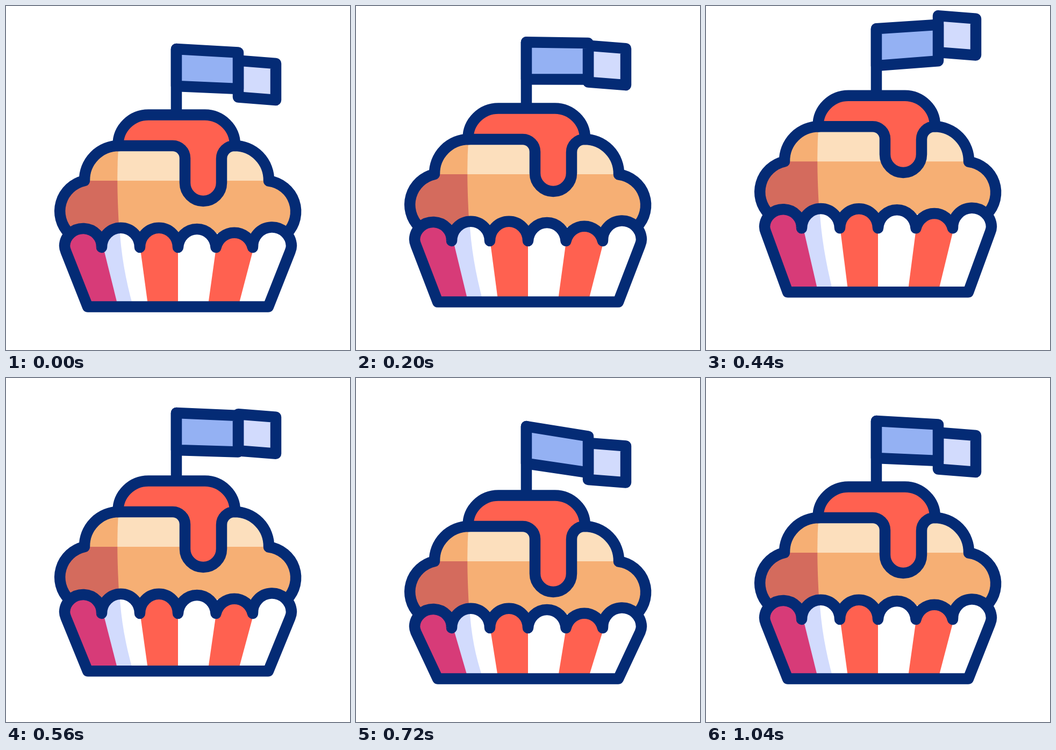
An HTML page with a canvas that plays this animation: 640x640 px, repeating every 1480 ms.

```html
<!DOCTYPE html>
<html>
<head>
<meta charset="utf-8">
<style>
  html, body { margin: 0; width: 100%; height: 100%; overflow: hidden; background: #fff; }
  canvas { display: block; width: 100vw; height: 100vh; }
</style>
</head>
<body>
<canvas id="stage" width="640" height="640"></canvas>
<script>
const ctx = document.getElementById('stage').getContext('2d');
const LOOP = 1480, STEP = 40;
const NAVY = '#042b75', RED = '#ff6150', TAN = '#f6af74', CREAM = '#fcdfbd', ROSE = '#d46b5d',
      PINK = '#d73b78', LILAC = '#d2dbfd', BLUE = '#94b1f3', WHITE = '#fff';

const smooth = p => p * p * (3 - 2 * p);
const span = (t, a, b) => Math.min(1, Math.max(0, (t - a) / (b - a)));

// Vertical offset going rest -> leap -> squash -> rest
function offsetAt(t) {
  const up = smooth(span(t, 80, 400));
  const down = smooth(span(t, 400, 720));
  const p = span(t, 720, 1040);
  const settle = smooth(p + 0.54 * p * p * (1 - p));
  return (leap, squash) => (leap * up + (squash - leap) * down) - squash * settle;
}

function fill(d, color) {
  ctx.fillStyle = color;
  ctx.fill(new Path2D(d));
}

function stroke(d) {
  ctx.stroke(new Path2D(d));
}

function shape(d, color) {
  fill(d, color);
  stroke(d);
}

function clipped(d, paint) {
  ctx.save();
  ctx.clip(new Path2D(d));
  paint();
  ctx.restore();
}

function drawFlag(left, right, tip, poleEnd) {
  stroke(`M317 ${80 + left}V${poleEnd}`);
  shape(`M432 ${101.5 + tip}l70 5.5v68l-70 -5.5z`, LILAC);
  shape(`M317 ${80 + left}L432 ${86.5 + right}v67.5L317 ${149 + left}z`, BLUE);
}

function drawCake(drip) {
  const leftSide = 'M210 260A64 64 0 0 0 146 325A58 58 0 0 0 117.5 423';
  const rightSide = 'M425 260A64 64 0 0 1 489 325.5A57.5 57.5 0 0 1 522.5 423';
  const body = leftSide + 'H522.5A57.5 57.5 0 0 0 489 325.5A64 64 0 0 0 425 260Z';
  clipped(body, () => {
    fill('M80 240H560V460H80z', TAN);
    fill('M80 325H207.3Q207.3 365 211 425H80z', ROSE);
    fill('M209.5 255Q207 290 207.3 325H560V255z', CREAM);
  });
  stroke(leftSide);
  stroke(rightSide);
  const end = 329 + drip;
  shape(`M208.5 260V258A56.5 55.5 0 0 1 265 202.5H370A56.5 55.5 0 0 1 426 258V260H425
    A24 24 0 0 0 401 284V${end}A34 34 0 0 1 333 ${end}V283A23 23 0 0 0 310 260Z`, RED);
}

function drawCup(bottom) {
  const scallops = [249, 320, 390.5, 459].map(x => `A35.3 36 0 0 1 ${x} 449`).join('');
  const cup = `M152 ${bottom}L111.5 457Q109 451 109 446A34.5 33.5 0 0 1 178 449${scallops}
    A36 36 0 0 1 531 446Q531 451 528.5 457L488 ${bottom}Z`;
  // Each stripe is painted from its left edge to the far right
  const stripe = (top, foot, color) => fill(`M${top} 400V449L${foot} ${bottom}H560V400z`, color);
  clipped(cup, () => {
    stripe(90, 90, PINK);
    stripe(181, 208.5, LILAC);
    fill(`M211 405Q214 480 236.5 ${bottom}H560V405z`, WHITE);
    stripe(249.5, 264.5, RED);
    stripe(320, 320, WHITE);
    stripe(391, 375.5, RED);
    stripe(461, 432, WHITE);
  });
  stroke(cup);
}

function draw(t) {
  const move = offsetAt(t);
  const body = move(-38, 16);
  ctx.fillStyle = WHITE;
  ctx.fillRect(0, 0, 640, 640);
  ctx.strokeStyle = NAVY;
  ctx.lineWidth = 20.5;
  ctx.lineCap = ctx.lineJoin = 'round';
  drawFlag(move(-40, 10), move(-55, 22), move(-88, 19.5), 202 + body);
  ctx.save();
  ctx.translate(0, body);
  drawCake(move(-57, 35) - body);
  drawCup(559.5 + move(-28.5, 0) - body);
  ctx.restore();
}

const start = performance.now();
function tick() {
  const t = (performance.now() - start) % LOOP;
  draw(Math.floor(t / STEP) * STEP);
  requestAnimationFrame(tick);
}
tick();
</script>
</body>
</html>
```
